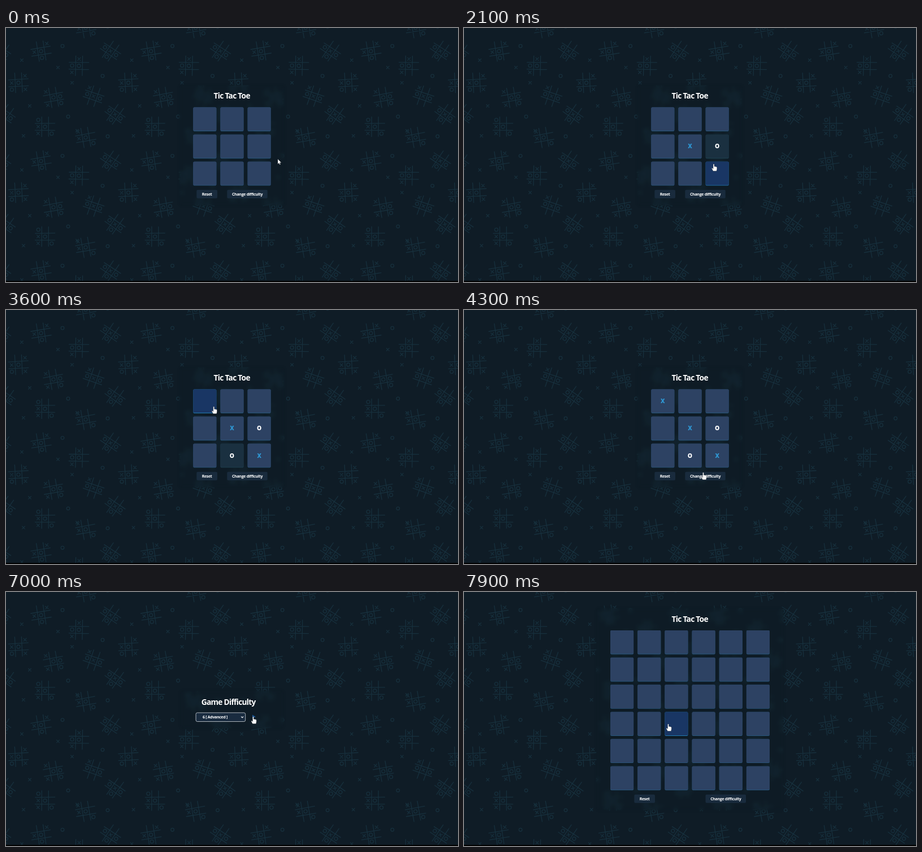
Write an HTML page that moves like this. It is 800 px wide and 450 px high and loops after 8 s.

```html
<!DOCTYPE html>
<html lang="en">
<head>
<meta charset="utf-8">
<title>Tic Tac Toe</title>
<style>
html, body { margin: 0; width: 100%; height: 100%; overflow: hidden; background: #0f1c26; }
#stage { position: relative; width: 800px; height: 450px; overflow: hidden; }
svg { position: absolute; left: 0; top: 0; font-family: "Open Sans", "Noto Sans", sans-serif; }
#panel { position: absolute; border-radius: 6px; backdrop-filter: blur(3px);
  background: rgba(15, 27, 37, .15); box-shadow: 0 0 6px rgba(0, 0, 0, .04); }
#pattern { fill: none; stroke: #17303d; stroke-width: 1.3; stroke-linecap: round; }
.title { font-size: 13.8px; font-weight: 700; fill: #fff; letter-spacing: -.75px; text-anchor: middle; }
.label { font-size: 7px; font-weight: 700; fill: #fff; letter-spacing: -.3px; }
.mid { text-anchor: middle; }
.mark { font-size: 10.4px; font-weight: 800; text-anchor: middle; }
</style>
</head>
<body>
<div id="stage">
  <svg width="800" height="450">
    <rect width="800" height="450" fill="#0f1c26"/>
    <g id="pattern"></g>
    <rect y="448" width="800" height="2" fill="#000"/>
  </svg>
  <div id="panel"></div>
  <svg width="800" height="450">
    <g id="scene"></g>
    <path id="cursor" fill="#fff" stroke="#101820" stroke-width=".4" stroke-linejoin="round"/>
  </svg>
</div>
<script>
const $ = id => document.getElementById(id);
const LOOP = 8000, STEP = 100, TILE = 194.6, PITCH = 48.15;

// Wallpaper: x, y, tilt and marks of each doodled board in a tile
const boards = [
  [62, 41, -8, "..xxo..o."], [185, 41, 35, "...oxo.o."], [129, 67, 2, ".x.oo.x.."],
  [22, 97, -2, "..xxo.o.x"], [84, 123, -9, "x...oox.o"], [155, 121, 20, "x..oxo..."],
  [193, 153, 36, "...oxo.o."], [69, 175, 1, "o..xo.x.o"], [141, 194, -9, "x..xo...o"]
];
const crosses = [[92, 70], [28, 57], [42, 138], [117, 97], [126, 182], [31, 191]];
const rings = [[100, 32], [171, 85], [110, 157], [180, 192]];

const cross = (x, y, r) => `<path d="M${x - r} ${y - r}l${2 * r} ${2 * r}m0 ${-2 * r}l${-2 * r} ${2 * r}"/>`;
const ring = (x, y, r) => `<circle cx="${x}" cy="${y}" r="${r}"/>`;

function doodle([x, y, tilt, marks]) {
  const signs = [...marks].map((m, i) => {
    const cx = (i % 3 - 1) * 12, cy = (Math.floor(i / 3) - 1) * 12;
    return m === "x" ? cross(cx, cy, 2.5) : m === "o" ? ring(cx, cy, 3) : "";
  }).join("");
  return `<g transform="translate(${x} ${y}) rotate(${tilt})">` +
    `<path d="M-6 -17.5L-5.5 17.5M6 -17.5L6.5 17M-17.5 -5.5L17.5 -6.5M-17.5 6.5L17.5 6"/>${signs}</g>`;
}

const tile = boards.map(doodle).join("") +
  crosses.map(([x, y]) => cross(x, y, 2.3)).join("") +
  rings.map(([x, y]) => ring(x, y, 2.8)).join("");
let paper = "";
for (let r = -1; r < 3; r++)
  for (let c = -1; c < 5; c++)
    paper += `<g transform="translate(${c * TILE} ${r * TILE})">${tile}</g>`;
$("pattern").innerHTML = paper;

// Pointer: time, x, y
const path = [
  [0, 481, 232], [300, 478, 230], [900, 404, 221], [1200, 398.5, 218.5], [1700, 399, 219],
  [2100, 442, 240.5], [2400, 446, 250], [2800, 446, 250], [3500, 368, 171], [3800, 367, 170.5],
  [4400, 428, 297], [4700, 428, 297], [5100, 430.5, 237], [5400, 430.5, 237], [5800, 375, 222],
  [6100, 375, 222], [6600, 378, 276], [6750, 378, 276], [7000, 437.5, 220.5], [7300, 437.5, 220.5],
  [7900, 361.5, 233.5]
];
// Moves: time, cell, sign
const moves = [[1400, 4, "X"], [1700, 5, "O"], [2400, 8, "X"], [2700, 7, "O"], [3800, 0, "X"]];

function pointer(t) {
  const i = path.findIndex(p => p[0] > t);
  if (i < 0) return path.at(-1).slice(1);
  const [t0, x0, y0] = path[i - 1], [t1, x1, y1] = path[i];
  const k = (t - t0) / (t1 - t0), e = k * k * (3 - 2 * k);
  return [x0 + (x1 - x0) * e, y0 + (y1 - y0) * e];
}

const arrow = "M0 0V9.2L2.1 7.3L3.5 10.3L5 9.6L3.6 6.7H6.4Z";
const hand = "M-1 .9Q0 -.5 1 .9V4.7L2.5 4.8L4.3 5.2L5.8 6V9.6L5 13H-1.1L-3.5 8.6Q-3.5 7.2 -2.3 7.6L-1 9Z";

const box = (x, y, w, h, fill, r = 2, more = "") =>
  `<rect x="${x}" y="${y}" width="${w}" height="${h}" rx="${r}" fill="${fill}" ${more}/>`;
const text = (x, y, cls, s, more = "") => `<text x="${x}" y="${y}" class="${cls}" ${more}>${s}</text>`;
const inside = ([px, py], x, y, w, h) => px >= x && px < x + w && py >= y && py < y + h;

function setPanel(x, y, w, h) {
  Object.assign($("panel").style, { left: x + "px", top: y + "px", width: w + "px", height: h + "px" });
}

function game(n, at, t) {
  const side = (n - 1) * PITCH + 41, left = 400 - side / 2, top = n === 3 ? 140.5 : 68;
  const bottom = top + side + 1, played = n === 3 ? moves.filter(m => m[0] <= t) : [];
  const last = played.at(-1);
  let hot = false;
  let out = text(399.7, top - 15.2, "title", "Tic Tac Toe");
  for (let i = 0; i < n * n; i++) {
    const x = left + i % n * PITCH, y = top + Math.floor(i / n) * PITCH;
    const move = played.find(m => m[1] === i), over = inside(at, x, y, 41, 42.5);
    const fresh = move && move === last && move[2] === "O";
    hot ||= over;
    out += box(x, y, 41, 42.5, over ? "#237bb2" : fresh ? "#1f4352" : "#28577c") +
      box(x, y, 41, 41.6, over ? "#193664" : fresh ? "#1a3040" : "#2d4263");
    if (move) out += text(x + 20.5, y + 24.7, "mark", move[2], `fill="${move[2] === "X" ? "#2f97d3" : "#fff"}"`);
  }
  const button = (x, w, label) => {
    const y = bottom + 8;
    hot ||= inside(at, x, y, w, 15);
    out += box(x, y, w, 15, "#192b3d") + text(x + w / 2, y + 10, "label mid", label);
  };
  button(n === 3 ? 337.3 : 301.3, 36.7, "Reset");
  button(n === 3 ? 391.3 : 427.5, 71.5, "Change difficulty");
  setPanel(left - 25, top - 40, side + 50, side + 77);
  return [out, hot];
}

const levels = ["3 [ Easy ]", "4 [ Normal ]", "5 [ Hard ]", "6 [ Advanced ]", "7 [ Expert ]"];

function difficulty(at, t) {
  const focus = t >= 6000, open = focus && t < 6700, hot = inside(at, 433, 216, 11, 11);
  let out = text(393.7, 200, "title", "Game Difficulty") +
    (focus ? box(336.1, 213.9, 87.6, 15.6, "#192b3f", 2.5, 'stroke="#d3d8dd" stroke-width=".8"')
      : box(337, 214.3, 86, 14.7, "#192b3f")) +
    text(348, 224.2, "label", levels[t < 6700 ? 0 : 3]) +
    '<path d="M416.2 220.6l2 2l2 -2" fill="none" stroke="#fff" stroke-width="1.1"/>' +
    `<path d="M436 217.6L441.8 220.9L436 224.2Z" fill="${hot ? "#1b5797" : "#1a73cb"}"/>`;
  if (open) {
    out += box(336.5, 230, 87, 66, "#192b3f", 0);
    const pick = Math.max(0, Math.floor((at[1] - 230.5) / 13));
    levels.forEach((s, i) => {
      const y = 230.5 + i * 13;
      if (i === pick) out += box(337, y, 86, 13, "#1e68c0", 0);
      out += text(348, y + 9, "label", s);
    });
  }
  setPanel(308, 174, 184, 68);
  return [out, hot];
}

let drawn = -1;
function frame() {
  const t = Math.floor(performance.now() % LOOP / STEP) * STEP;
  if (t !== drawn) {
    drawn = t;
    const at = pointer(t);
    const [out, hot] = t < 4600 ? game(3, at, t) : t < 7300 ? difficulty(at, t) : game(6, at, t);
    $("scene").innerHTML = out;
    $("cursor").setAttribute("d", hot ? hand : arrow);
    $("cursor").setAttribute("transform", `translate(${at[0]} ${at[1]})`);
  }
  requestAnimationFrame(frame);
}
frame();
</script>
</body>
</html>
```
